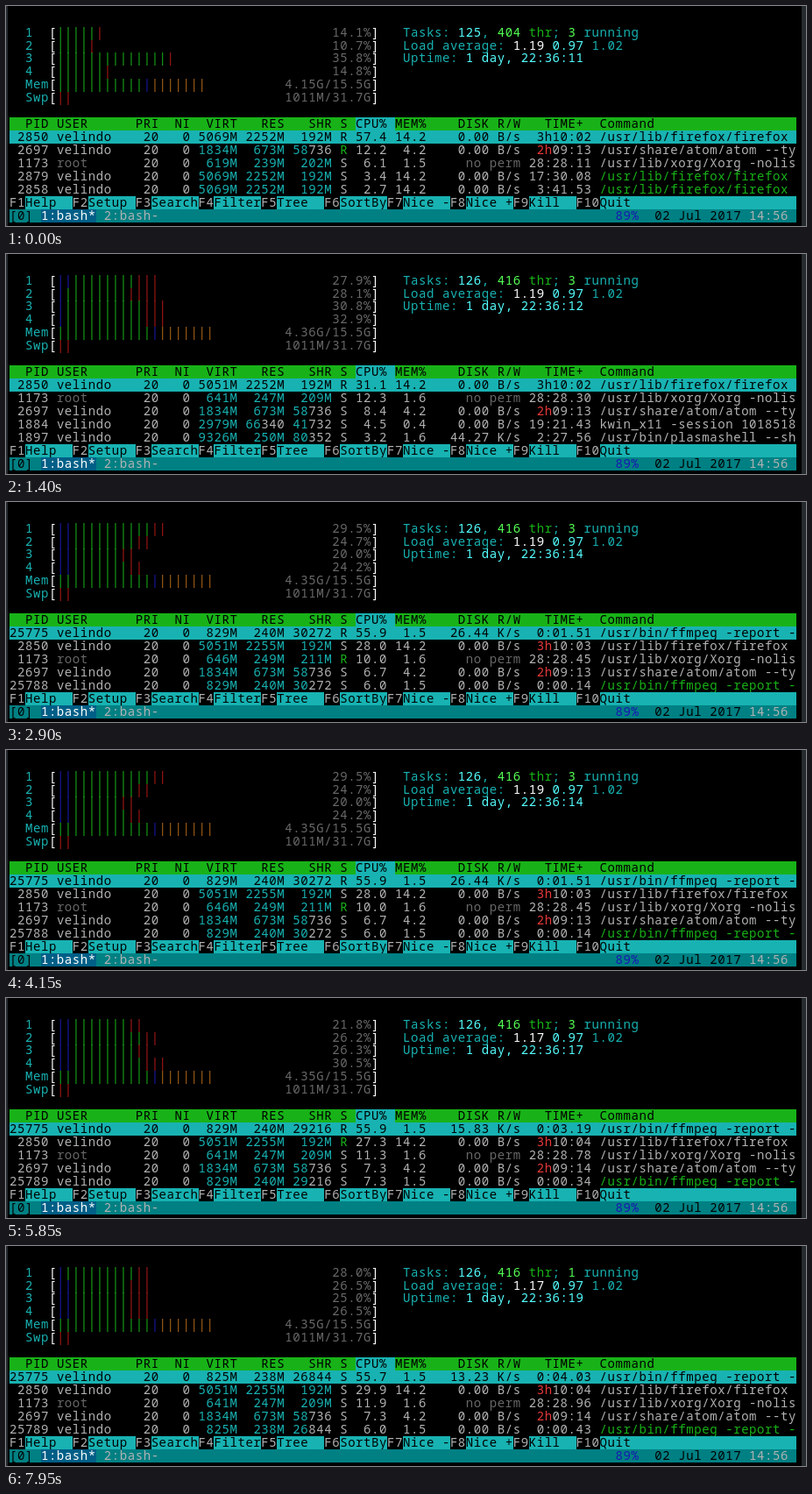
An HTML page that plays this animation: 913 by 251 pixels, repeating every 8 s.

```html
<!DOCTYPE html>
<html lang="en">
<head>
<meta charset="utf-8">
<title>Process monitor</title>
<style>
  html, body { margin: 0; width: 100%; height: 100%; overflow: hidden; background: #000; }
  #screen {
    position: relative; box-sizing: border-box; width: 913px; height: 251px; overflow: hidden;
    border: solid #262b30; border-width: 0 5px 0 2px;
    font: 14px "Noto Sans Mono", "DejaVu Sans Mono", monospace;
    letter-spacing: calc(8.98px - 1ch);
  }
  #screen span { position: absolute; height: 14.93px; line-height: 14.93px; white-space: pre; }
</style>
</head>
<body>
<div id="screen"></div>
<script>
const CELL_W = 8.98, CELL_H = 14.93, LEFT = 2, TOP = 22.6, COLS = 100;
const LOOP = 8000, USER = 'velindo';
const C = {
  black: '#000', grey: '#b2b2b2', dim: '#686868', white: '#fff',
  cyan: '#18b2b2', green: '#18b218', red: '#b21818', blue: '#1818b2', brown: '#b26818',
  brightCyan: '#54ffff', brightGreen: '#54ff54', brightRed: '#e83838',
  status: '#008083', tab: '#005f87'
};
const COMMANDS = {
  fox: '/usr/lib/firefox/firefox',
  atom: '/usr/share/atom/atom --ty',
  xorg: '/usr/lib/xorg/Xorg -nolis',
  kwin: 'kwin_x11 -session 1018518',
  plasma: '/usr/bin/plasmashell --sh',
  ffmpeg: '/usr/bin/ffmpeg -report -'
};

// cpu: percent and blue/green/red bar counts
// rows: pid virt res shr state cpu mem disk time command (* marks a thread)
const STATES = [
  { at: 0, tasks: '125 404 3', load: '1.19', sec: 11, mem: '4.15G', memGreen: 11,
    cpu: ['14.1 0/5/1', '10.7 0/4/1', '35.8 0/14/1', '14.8 0/6/1'],
    rows: ['2850 5069M 2252M 192M R 57.4 14.2 0.00_B/s 3h10:02 fox',
           '2697 1834M 673M 58736 R 12.2 4.2 0.00_B/s 2h09:13 atom',
           '1173 619M 239M 202M S 6.1 1.5 no_perm 28:28.11 xorg',
           '2879 5069M 2252M 192M S 3.4 14.2 0.00_B/s 17:30.08 *fox',
           '2858 5069M 2252M 192M S 2.7 14.2 0.00_B/s 3:41.53 *fox'] },
  { at: 1300, tasks: '126 416 3', load: '1.19', sec: 12, mem: '4.36G', memGreen: 12,
    cpu: ['27.9 2/8/3', '28.1 1/8/4', '30.8 1/10/3', '32.9 1/10/3'],
    rows: ['2850 5051M 2252M 192M R 31.1 14.2 0.00_B/s 3h10:02 fox',
           '1173 641M 247M 209M S 12.3 1.6 no_perm 28:28.30 xorg',
           '2697 1834M 673M 58736 S 8.4 4.2 0.00_B/s 2h09:13 atom',
           '1884 2979M 66340 41732 S 4.5 0.4 0.00_B/s 19:21.43 kwin',
           '1897 9326M 250M 80352 S 3.2 1.6 44.27_K/s 2:27.56 plasma'] },
  { at: 2850, tasks: '126 416 3', load: '1.19', sec: 14, mem: '4.35G', memGreen: 12,
    cpu: ['29.5 2/10/2', '24.7 2/8/2', '20.0 2/6/2', '24.2 2/7/2'],
    rows: ['25775 829M 240M 30272 R 55.9 1.5 26.44_K/s 0:01.51 ffmpeg',
           '2850 5051M 2255M 192M S 28.0 14.2 0.00_B/s 3h10:03 fox',
           '1173 646M 249M 211M R 10.0 1.6 no_perm 28:28.45 xorg',
           '2697 1834M 673M 58736 S 6.7 4.2 0.00_B/s 2h09:13 atom',
           '25788 829M 240M 30272 S 6.0 1.5 0.00_B/s 0:00.14 *ffmpeg'] },
  { at: 4300, tasks: '126 416 6', load: '1.17', sec: 16, mem: '4.35G', memGreen: 12,
    cpu: ['26.3 1/9/2', '29.8 2/9/3', '24.3 2/7/2', '25.8 2/8/1'],
    rows: ['25775 825M 237M 26844 S 55.3 1.5 28.87_K/s 0:02.35 ffmpeg',
           '2850 5051M 2255M 192M S 28.9 14.2 0.00_B/s 3h10:03 fox',
           '1173 646M 250M 212M R 10.5 1.6 no_perm 28:28.61 xorg',
           '2697 1834M 673M 58736 S 6.6 4.2 0.00_B/s 2h09:14 atom',
           '25788 825M 237M 26844 R 5.9 1.5 0.00_B/s 0:00.23 *ffmpeg'] },
  { at: 5800, tasks: '126 416 3', load: '1.17', sec: 17, mem: '4.35G', memGreen: 12,
    cpu: ['21.8 2/7/2', '26.2 2/9/2', '26.3 2/8/2', '30.5 2/9/3'],
    rows: ['25775 829M 240M 29216 R 55.9 1.5 15.83_K/s 0:03.19 ffmpeg',
           '2850 5051M 2255M 192M R 27.3 14.2 0.00_B/s 3h10:04 fox',
           '1173 641M 247M 209M S 11.3 1.6 no_perm 28:28.78 xorg',
           '2697 1834M 673M 58736 S 7.3 4.2 0.00_B/s 2h09:14 atom',
           '25789 829M 240M 29216 S 7.3 1.5 0.00_B/s 0:00.34 *ffmpeg'] },
  { at: 7300, tasks: '126 416 1', load: '1.17', sec: 19, mem: '4.35G', memGreen: 12,
    cpu: ['28.0 1/9/2', '26.5 2/7/3', '25.0 2/7/3', '26.5 2/7/3'],
    rows: ['25775 825M 238M 26844 S 55.7 1.5 13.23_K/s 0:04.03 ffmpeg',
           '2850 5051M 2255M 192M S 29.9 14.2 0.00_B/s 3h10:04 fox',
           '1173 641M 247M 209M S 11.9 1.6 no_perm 28:28.96 xorg',
           '2697 1834M 673M 58736 S 7.3 4.2 0.00_B/s 2h09:14 atom',
           '25789 825M 238M 26844 S 6.0 1.5 0.00_B/s 0:00.43 *ffmpeg'] }
];

const screen = document.getElementById('screen');

function put(row, col, text, color, bg) {
  const span = document.createElement('span');
  span.textContent = text;
  span.style.left = LEFT + col * CELL_W + 'px';
  span.style.top = TOP + row * CELL_H + 'px';
  span.style.color = C[color];
  if (bg) span.style.background = C[bg];
  screen.append(span);
  return col + text.length;
}

// Writes [text, color] runs one after another
function putRuns(row, col, ...runs) {
  for (const [text, color] of runs) col = put(row, col, text, color);
}

// Right-aligned: end is the column after the last character
const putRight = (row, end, text, color) => put(row, end - text.length, text, color);

function meter(row, label, value, ...bars) {
  put(row, 2, label, 'cyan');
  put(row, 5, '[', 'white');
  putRuns(row, 6, ...bars.map(([count, color]) => ['|'.repeat(count), color]));
  putRight(row, 46, value, 'dim');
  put(row, 46, ']', 'white');
}

function memory(row, end, text, pick) {
  putRight(row, end, text, pick('cyan'));
  if (!text.endsWith('M')) putRight(row, end, text.slice(-3), pick('grey'));
}

function processRow(line, index) {
  const row = 8 + index, selected = index === 0;
  const pick = color => selected ? 'black' : color;
  const [pid, virt, res, shr, state, cpu, mem, disk, time, name] = line.split(' ');
  const root = pid === '1173', thread = name[0] === '*';

  if (selected) put(row, 0, ' '.repeat(COLS), 'black', 'cyan');
  putRight(row, 5, pid, pick('grey'));
  put(row, 6, root ? 'root' : USER, pick(root ? 'dim' : 'grey'));
  put(row, 17, '20   0', pick('grey'));
  memory(row, 29, virt.endsWith('M') ? virt : virt, pick);
  if (res.endsWith('M')) memory(row, 35, res, pick);
  else splitMemory(row, 35, res, pick);
  if (shr.endsWith('M')) memory(row, 41, shr, pick);
  else splitMemory(row, 41, shr, pick);
  put(row, 42, state, pick(state === 'R' ? 'green' : 'grey'));
  putRight(row, 48, cpu, pick('grey'));
  putRight(row, 53, mem, pick('grey'));
  putRight(row, 65, disk.replace('_', ' '), pick(root ? 'dim' : 'grey'));
  const hours = time.indexOf('h') + 1;
  putRuns(row, 74 - time.length,
    [time.slice(0, hours), pick('brightRed')], [time.slice(hours), pick('grey')]);
  put(row, 75, COMMANDS[name.replace('*', '')], pick(thread ? 'green' : 'grey'));
}

// Kilobyte counts show the thousands in cyan
function splitMemory(row, end, text, pick) {
  putRuns(row, end - text.length,
    [text.slice(0, -3), pick('cyan')], [text.slice(-3), pick('grey')]);
}

function functionKeys() {
  put(13, 0, ' '.repeat(COLS), 'black', 'cyan');
  const labels = ['Help', 'Setup', 'Search', 'Filter', 'Tree', 'SortBy', 'Nice -', 'Nice +', 'Kill', 'Quit'];
  labels.forEach((label, i) => {
    const col = put(13, i * 8, 'F' + (i + 1), 'grey', 'black');
    put(13, col, label, 'black');
  });
}

function statusBar() {
  put(14, 0, ' '.repeat(COLS), 'black', 'status');
  put(14, 0, '[0]', 'black');
  put(14, 4, '1:bash*', 'white', 'tab');
  put(14, 12, '2:bash-', 'grey');
  put(14, 77, '89%', 'blue');
  put(14, 82, '02 Jul 2017', 'black');
  put(14, 94, '14:56', 'grey');
}

function render(s) {
  screen.replaceChildren();
  s.cpu.forEach((entry, i) => {
    const [percent, counts] = entry.split(' ');
    const [low, normal, kernel] = counts.split('/').map(Number);
    meter(i, String(i + 1), percent + '%', [low, 'blue'], [normal, 'green'], [kernel, 'red']);
  });
  meter(4, 'Mem', s.mem + '/15.5G', [s.memGreen, 'green'], [1, 'blue'], [7, 'brown']);
  meter(5, 'Swp', '1011M/31.7G', [2, 'red']);

  const [tasks, threads, running] = s.tasks.split(' ');
  putRuns(0, 50, ['Tasks: ', 'cyan'], [tasks, 'brightCyan'], [', ', 'cyan'],
    [threads, 'brightGreen'], [' thr', 'green'], ['; ', 'cyan'],
    [running, 'brightGreen'], [' running', 'cyan']);
  putRuns(1, 50, ['Load average: ', 'cyan'], [s.load + ' ', 'white'],
    ['0.97 ', 'brightCyan'], ['1.02', 'cyan']);
  putRuns(2, 50, ['Uptime: ', 'cyan'], ['1 day, 22:36:' + s.sec, 'brightCyan']);

  const header = '  PID USER      PRI  NI  VIRT   RES   SHR S CPU% MEM%    DISK R/W   TIME+  Command';
  put(7, 0, header.padEnd(COLS), 'black', 'green');
  put(7, 44, 'CPU% ', 'black', 'cyan');
  s.rows.forEach(processRow);
  functionKeys();
  statusBar();
}

let shown;
function frame() {
  const time = performance.now() % LOOP;
  const state = STATES.findLast(s => s.at <= time);
  if (state !== shown) render(shown = state);
  requestAnimationFrame(frame);
}
frame();
</script>
</body>
</html>
```
